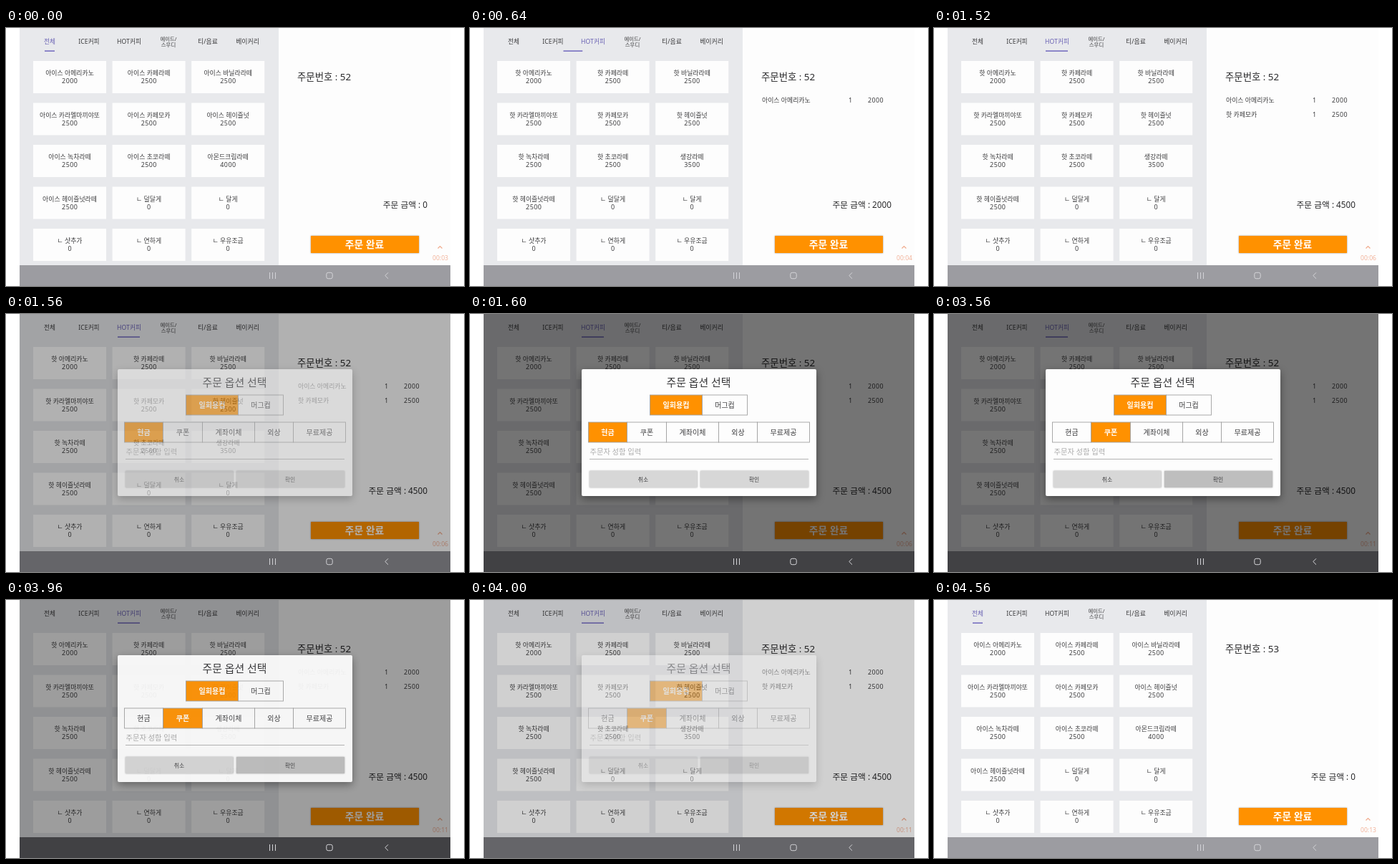
Animation of 640 by 360 pixels, one loop 4760 ms. Source, as an HTML page:

```html
<!DOCTYPE html>
<html lang="ko">
<head>
<meta charset="utf-8">
<title>카페 주문 화면</title>
<style>
html, body { margin: 0; width: 100%; height: 100%; overflow: hidden; background: #fff; }
svg { display: block; width: 640px; height: 360px; }
text { font-family: "Noto Sans", "Noto Sans CJK KR", "Noto Sans CJK", sans-serif; font-size: 8.9px; fill: #3c3c3e; }
.num { letter-spacing: .4px; }
.mid { text-anchor: middle; }
.end { text-anchor: end; }
.semi { font-weight: 500; }
.bold { font-weight: 700; }
</style>
</head>
<body>
<svg id="stage" viewBox="0 0 640 360"></svg>
<script>
const LOOP = 4760;
const ORANGE = "#ff9100";
const stage = document.getElementById("stage");

function add(parent, tag, attrs, content) {
  const el = document.createElementNS("http://www.w3.org/2000/svg", tag);
  for (const key in attrs) el.setAttribute(key, attrs[key]);
  if (content !== undefined) el.textContent = content;
  parent.append(el);
  return el;
}
const rect = (parent, x, y, width, height, fill, more) =>
  add(parent, "rect", { x, y, width, height, fill, ...more });
const label = (parent, x, y, content, cls = "", size = 8.9, fill = "#3c3c3e") =>
  add(parent, "text", { x, y, class: cls, style: `font-size:${size}px;fill:${fill}` }, content);
const line = (parent, d, stroke, width = 1) =>
  add(parent, "path", { d, stroke, "stroke-width": width, fill: "none" });
const group = (parent, attrs) => add(parent, "g", attrs || {});
const show = (el, on) => { el.style.display = on ? "" : "none"; };
const shadow = (y, blur, alpha) => ({ style: `filter:drop-shadow(0 ${y}px ${blur}px rgba(0,0,0,${alpha}))` });

// Menu panel
rect(stage, 19, 0, 362, 331, "#e8e9ec");
const tabs = [
  label(stage, 61, 22, "전체", "mid", 8.7),
  label(stage, 116, 22, "ICE커피", "mid", 8.7),
  label(stage, 172, 22, "HOT커피", "mid", 8.7),
];
label(stage, 227, 17.5, "에이드/", "mid", 7.4);
label(stage, 227, 25.5, "스무디", "mid", 7.4);
label(stage, 282, 22, "티/음료", "mid", 8.9);
label(stage, 337.5, 22, "베이커리", "mid", 8.9);
const marker = rect(stage, 54, 31.3, 14, 1.6, "#776fc0");

const extras = ["ㄴ 덜달게", "ㄴ 달게", "ㄴ 샷추가", "ㄴ 연하게", "ㄴ 우유조금"];
const drinks = ["아메리카노", "카페라떼", "바닐라라떼", "카라멜마끼야또", "카페모카",
  "헤이즐넛", "녹차라떼", "초코라떼", "", "헤이즐넛라떼"];
const menu = (prefix, special, price) =>
  drinks.map((name, i) => name ? [`${prefix} ${name}`, i ? 2500 : 2000] : [special, price])
    .concat(extras.map(name => [name, 0]));
const iced = menu("아이스", "아몬드크림라떼", 4000);
const hot = menu("핫", "생강라떼", 3500);

const cards = iced.map((_, i) => {
  const x = 38 + (i % 3) * 110.6, y = 46 + Math.floor(i / 3) * 58.5;
  rect(stage, x, y, 102, 45, "#fdfdfd");
  return [label(stage, x + 51, y + 20, "", "mid"), label(stage, x + 51.2, y + 31, "", "mid num", 9)];
});

// Order panel
rect(stage, 381, 0, 240, 331, "#fdfdfd");
const orderNo = label(stage, 407, 73, "", "semi", 13.4, "#29292b");
const rows = [["아이스 아메리카노", 2000], ["핫 카페모카", 2500]].map(([name, price], i) => {
  const g = group(stage), y = 104 + i * 20;
  label(g, 408, y, name);
  label(g, 531.5, y, "1", "mid");
  label(g, 578, y, price, "end num");
  return g;
});
const total = label(stage, 589, 251, "", "end semi", 11.75, "#29292b");
rect(stage, 426, 290, 151, 24, ORANGE, shadow(.6, 1, .4));
label(stage, 501, 306.6, "주문 완료", "mid bold", 13.8, "#fff");
line(stage, "M603.5 307.5l3-3 3 3", "#f0aa8c", 1.2);
const clock = label(stage, 607, 324, "", "mid", 8.6, "#f2b49c");

// Navigation bar
const navBar = rect(stage, 19, 331, 602, 29, "#9c9ca1");

// Dialog
const dim = rect(stage, 19, 0, 602, 331, "#000");
const nav = group(stage, { stroke: "#e6e6ea" });
line(nav, "M368.5 341v9M372.5 341v9M376.5 341v9");
rect(nav, 447.8, 341.3, 8.4, 8.4, "none", { rx: 2.4 });
line(nav, "M534 341.3l-4.2 4.2 4.2 4.2");

const dialog = group(stage);
rect(dialog, 156, 77, 328, 177, "#fdfdfd", { rx: 2, ...shadow(4, 6, .4) });
label(dialog, 319.5, 101, "주문 옵션 선택", "mid semi", 14.9, "#333335");

function choices(y, edges, names) {
  const items = names.map((name, i) => {
    const x = edges[i], w = edges[i + 1] - x;
    return [rect(dialog, x, y, w, 28, "#fff", { stroke: "#a0a0a0", "stroke-width": .9 }),
      label(dialog, x + w / 2, y + 17.7, name, "mid", 10)];
  });
  return chosen => items.forEach(([box, text], i) => {
    const on = i === chosen;
    box.setAttribute("fill", on ? ORANGE : "#fdfdfd");
    text.style.fill = on ? "#fff" : "#3c3c3e";
    text.style.fontWeight = on ? 700 : 400;
  });
}
const pickCup = choices(113, [251.5, 324.5, 387.5], ["일회용컵", "머그컵"]);
const pickPay = choices(151, [165.5, 219.5, 274.5, 347.5, 401.5, 474.5],
  ["현금", "쿠폰", "계좌이체", "외상", "무료제공"]);
label(dialog, 167.5, 196.3, "주문자 성함 입력", "", 10.3, "#a9a9a9");
line(dialog, "M167 202.5H473", "#ababab", .9);
rect(dialog, 167, 219, 150.5, 23, "#d7d7d7", shadow(.8, .8, .35));
const confirm = rect(dialog, 322, 219, 151, 23, "#d7d7d7", shadow(.8, .8, .35));
label(dialog, 242, 233.5, "취소", "mid", 7.8);
label(dialog, 397, 233.5, "확인", "mid", 7.8);

// Each track lists [start time, value]; values hold until the next entry.
const tracks = {
  second: [[0, 3], [240, 4], [720, 5], [1160, 6], [1640, 7], [2160, 8], [2640, 9], [3120, 10], [3560, 11], [4120, 12], [4560, 13]],
  items: [[0, 0], [80, 1], [1040, 2], [4040, 0]],
  number: [[0, 52], [4040, 53]],
  hot: [[0, 0], [600, 1], [4040, 0]],
  slide: [[0, 0], [560, .1], [600, .4], [640, .75], [680, .95], [720, 1], [4040, .6], [4080, .15], [4120, 0]],
  dim: [[0, 0], [1560, .3], [1600, .54], [3960, .38], [4000, .18], [4040, 0]],
  dialog: [[0, 0], [1560, .55], [1600, 1], [3960, .93], [4000, .4], [4040, 0]],
  nav: [[0, 0], [1560, .6], [1600, 1], [4000, .6], [4040, 0]],
  cup: [[0, 0], [2080, 1], [2480, 0]],
  pay: [[0, 0], [2720, 1]],
  press: [[0, 215], [3440, 206], [3480, 198], [3560, 190]],
};
const at = (name, t) => tracks[name].findLast(([start]) => start <= t)[1];
const mix = (a, b, k) => a + (b - a) * k;
const grey = (a, b, k) => `rgb(${[0, 1, 2].map(i => Math.round(mix(a[i], b[i], k)))})`;

function draw(t) {
  const get = name => at(name, t);
  const count = get("items"), slide = get("slide"), shown = get("nav");

  (get("hot") ? hot : iced).forEach(([name, price], i) => {
    cards[i][0].textContent = name;
    cards[i][1].textContent = price;
  });
  tabs[0].style.fill = slide < .5 ? "#6a62b4" : "#3c3c3e";
  tabs[2].style.fill = slide < .5 ? "#3c3c3e" : "#6a62b4";
  marker.setAttribute("x", mix(54, 156, slide));
  marker.setAttribute("width", mix(14, 31, slide));

  rows.forEach((row, i) => show(row, i < count));
  orderNo.textContent = `주문번호 : ${get("number")}`;
  total.textContent = `주문 금액 : ${[0, 2000, 4500][count]}`;
  clock.textContent = `00:${String(get("second")).padStart(2, "0")}`;

  dim.style.opacity = get("dim");
  dialog.style.opacity = get("dialog");
  navBar.setAttribute("fill", grey([156, 156, 161], [65, 65, 68], shown));
  nav.style.opacity = mix(.75, .9, shown);
  pickCup(get("cup"));
  pickPay(get("pay"));
  confirm.setAttribute("fill", `rgb(${Array(3).fill(get("press"))})`);
}

const begin = performance.now();
function frame() {
  draw((performance.now() - begin) % LOOP);
  requestAnimationFrame(frame);
}
frame();
</script>
</body>
</html>
```
